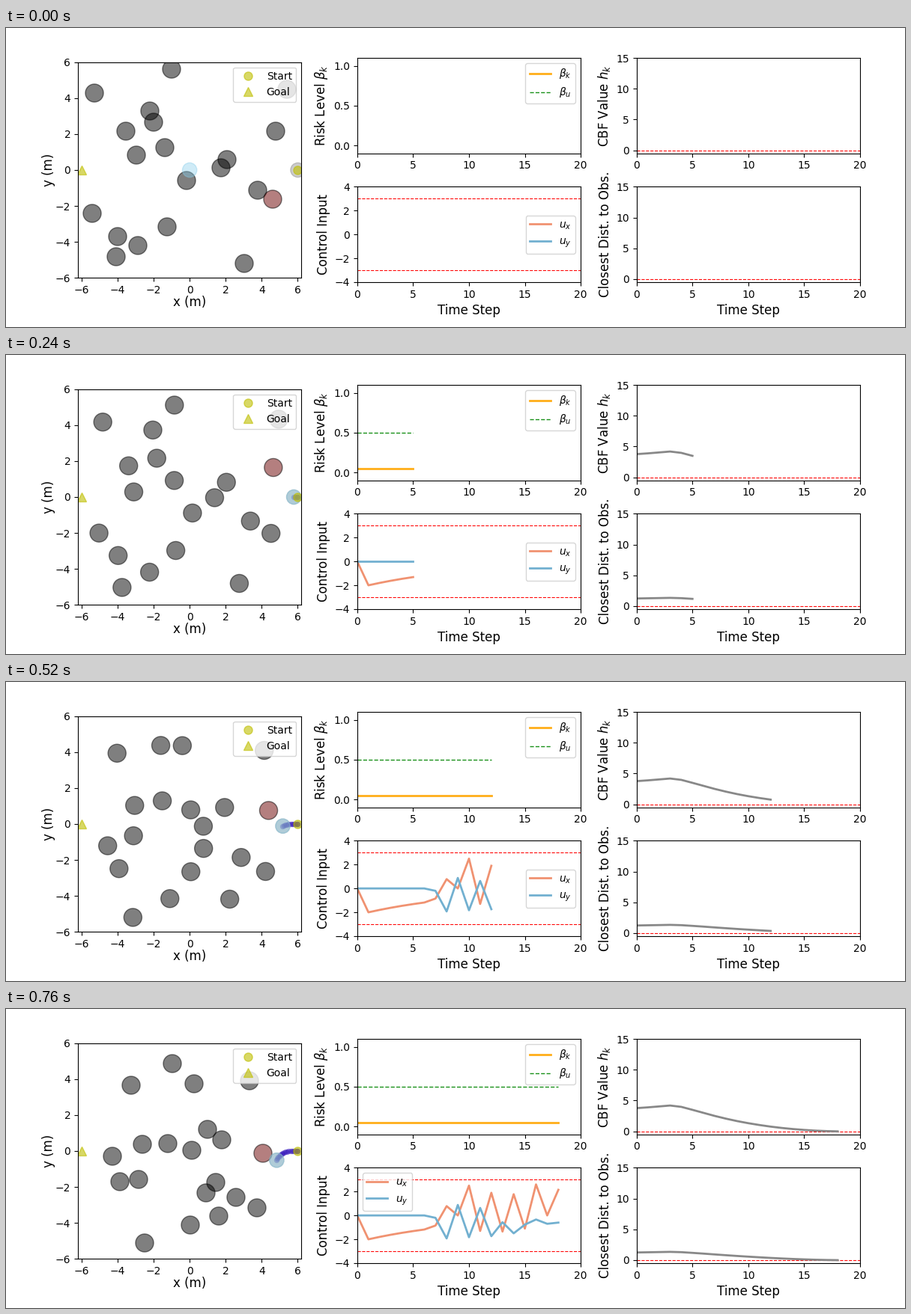
Write a matplotlib script that moves like this. It is 1200 px wide and 400 px high and loops after 800 ms.

```python
import numpy as np
import matplotlib.pyplot as plt
from matplotlib.animation import FuncAnimation
from matplotlib.patches import Circle

FRAMES, INTERVAL, DT = 20, 40, 0.1
OBSTACLE_R, ROBOT_R = 0.5, 0.4

# Each obstacle drifts from start to end (stage pixels) with a sideways bow.
DRIFTS = [
    ((221, 55), (251, 100), 5), ((118, 87), (167, 102), -1),
    ((192, 111), (222, 73), -5), ((197, 126), (216, 180), 0),
    ((160, 138), (182, 181), 2), ((174, 170), (177, 228), 6),
    ((212, 160), (269, 161), 11), ((360, 138), (343, 193), -1),
    ((375, 82), (325, 96), -1), ((295, 176), (288, 175), 8),
    ((287, 187), (248, 189), -5), ((241, 204), (280, 232), 2),
    ((336, 217), (307, 252), 6), ((356, 229), (335, 266), -4),
    ((115, 248), (142, 197), 5), ((215, 266), (267, 246), 0),
    ((149, 279), (152, 231), 0), ((176, 291), (246, 289), 0),
    ((147, 306), (185, 313), 5), ((318, 315), (284, 277), 2),
]


def drift(start, end, bow):
    """Accelerating, slightly curved path in metres, one row per frame."""
    start, step = np.array(start), np.subtract(end, start)
    normal = np.array([-step[1], step[0]]) / np.hypot(*step)
    s = np.linspace(0, 1, FRAMES)[:, None] ** 1.3
    pixels = start + s * step + 4 * s * (1 - s) * bow * normal
    return (pixels - (245.15, 190)) / (24.06, -24.06)


# Control: damped approach to the goal, then zigzag evasion.
approach = [(0, 0)] + [(-2 * 0.9 ** k, 0) for k in range(6)]
evasion = [(-0.85, -0.2), (0.78, -1.93), (0, 0.88), (2.5, -1.83),
           (-1.3, 0.63), (1.9, -1.74), (-1.35, -0.57), (1.78, -1.5),
           (-1.1, -0.77), (2.6, -0.34), (0, -0.7), (2.15, -0.6)]
u = np.array(approach + evasion)
steps = np.arange(len(u))

# Double integrator with the trapezoid rule.
v = np.cumsum(u, axis=0) * DT
robot = (6, 0) + DT * (np.cumsum(v, axis=0) - v / 2)

paths = np.array([drift(*d) for d in DRIFTS])
gap = np.linalg.norm(paths[:, :len(u)] - robot, axis=2)
nearest = gap.argmin(axis=0)
reach = OBSTACLE_R + ROBOT_R
closest = gap.min(axis=0) - reach
barrier = gap.min(axis=0) ** 2 - reach ** 2

plt.rcParams["font.family"] = "DejaVu Sans"
fig = plt.figure(figsize=(12, 4), dpi=100)
grid = fig.add_gridspec(2, 3, left=0.08, right=0.95, bottom=0.15, top=0.9,
                        wspace=0.25, hspace=0.35)


def time_axes(row, col, ylim, yticks, ylabel, limits=()):
    ax = fig.add_subplot(grid[row, col])
    ax.set(xlim=(0, 20), ylim=ylim, xticks=range(0, 21, 5), yticks=yticks)
    ax.set_ylabel(ylabel, fontsize=12)
    if row == 1:
        ax.set_xlabel("Time Step", fontsize=12)
    for y in limits:
        ax.axhline(y, color="r", ls="--", lw=0.8)
    return ax


def curve(ax, data, color, label=None, ls="-", lw=2):
    line, = ax.plot([], [], color=color, ls=ls, lw=lw, label=label)
    return line, data


# Map
arena = fig.add_subplot(grid[:, 0])
arena.set_aspect("equal")
arena.set(xlim=(-6.2, 6.2), ylim=(-6, 6),
          xticks=range(-6, 7, 2), yticks=range(-6, 7, 2))
arena.set_xlabel("x (m)", fontsize=12, labelpad=0)
arena.set_ylabel("y (m)", fontsize=12, labelpad=0)

obstacles = [arena.add_patch(Circle((0, 0), OBSTACLE_R, color="k", alpha=0.5))
             for _ in DRIFTS]
trail, = arena.plot([], [], "o", ms=5.3, mew=0, color="#2808b8", alpha=0.45,
                    zorder=1.5)
body = arena.add_patch(Circle((6, 0), ROBOT_R, color="gray", alpha=0.4,
                              zorder=1.7))
halo = arena.add_patch(Circle((0, 0), ROBOT_R, color="skyblue", alpha=0.4,
                              zorder=1.8))
arena.plot(6, 0, "yo", ms=8, alpha=0.6, label="Start")
arena.plot(-6, 0, "y^", ms=8, alpha=0.6, label="Goal")
arena.legend(loc="upper right")

# Charts
risk = time_axes(0, 1, (-0.1, 1.1), (0, 0.5, 1), r"Risk Level $\beta_k$")
control = time_axes(1, 1, (-4, 4), range(-4, 5, 2), "Control Input", (3, -3))
cbf = time_axes(0, 2, (-0.5, 15), range(0, 16, 5), "CBF Value $h_k$", (0,))
dist = time_axes(1, 2, (-0.5, 15), range(0, 16, 5), "Closest Dist. to Obs.",
                 (0,))
flat = np.ones(len(u))
curves = [
    curve(risk, 0.05 * flat, "#ffae19", r"$\beta_k$"),
    curve(risk, 0.5 * flat, "#199019", r"$\beta_u$", "--", 1),
    curve(control, u[:, 0], "#f09271", "$u_x$"),
    curve(control, u[:, 1], "#72b0d0", "$u_y$"),
    curve(cbf, barrier, "#888888"),
    curve(dist, closest, "#888888"),
]
risk.legend(loc="upper right")
control_legend = control.legend(loc="center right")


def update(i):
    last = max(i - 1, 0)
    for n, patch in enumerate(obstacles):
        patch.center = paths[n, i]
        patch.set_facecolor("#6a0000" if n == nearest[last] else "k")
    body.center = robot[last]
    halo.center = robot[last] if i else (0, 0)
    trail.set_data(robot[:i, 0], robot[:i, 1])
    for line, data in curves:
        line.set_data(steps[:i], data[:i])
    # The legend makes way once the curves reach it.
    control_legend.set_loc("center right" if last < 16 else "upper left")


anim = FuncAnimation(fig, update, frames=FRAMES, interval=INTERVAL,
                     init_func=lambda: update(0), repeat=True)
plt.show()
```
